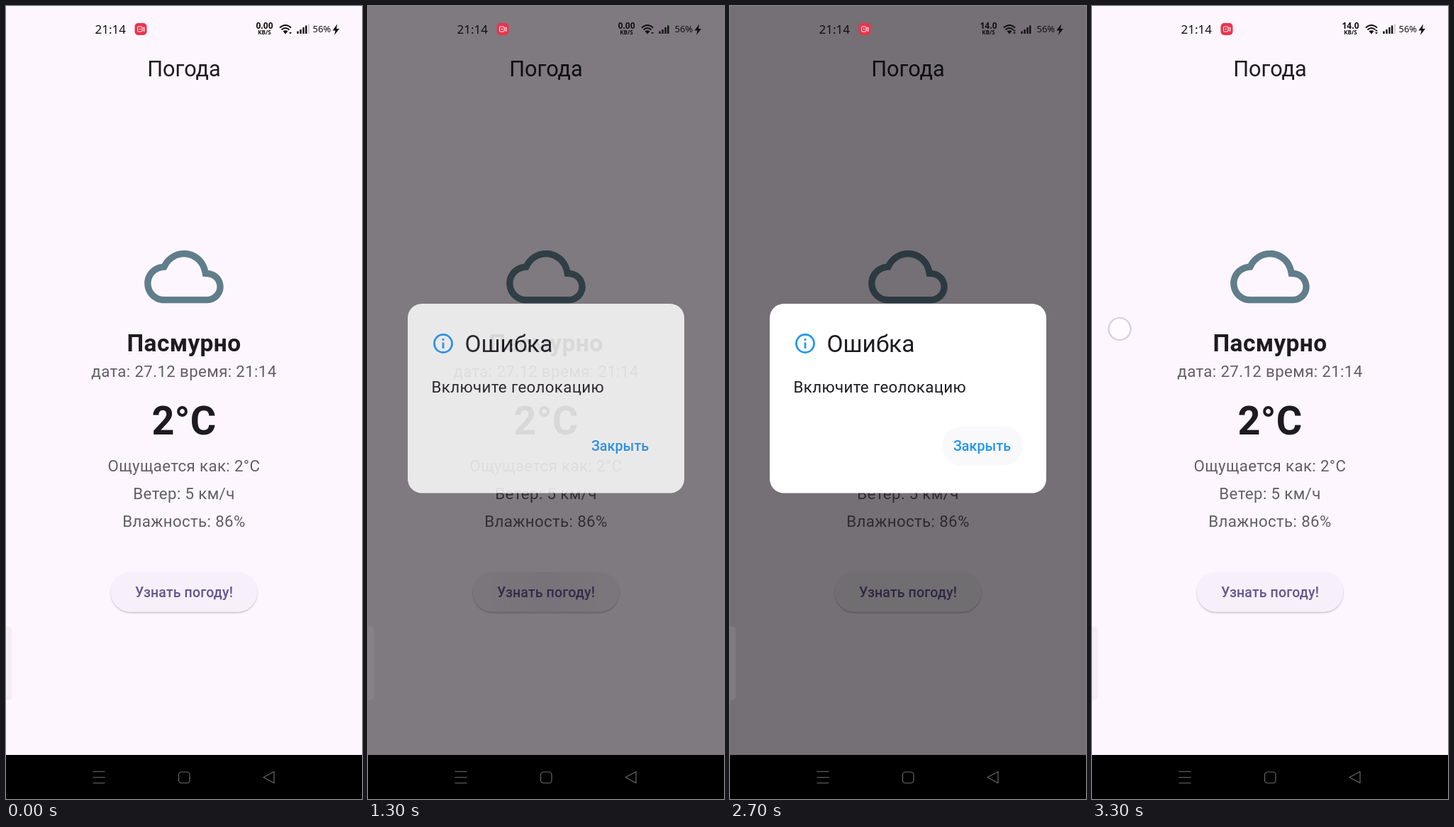
Recreate the animation shown at these times as an HTML page. Size 502 by 1116 pixels, loop 3.4 s.

```html
<!DOCTYPE html>
<html lang="ru">
<head>
<meta charset="utf-8">
<title>Погода</title>
<style>
  html, body { margin: 0; width: 100%; height: 100%; overflow: hidden; background: #fef6ff; }
  svg { display: block; width: 100vw; height: 100vh; }
  text { font-family: Roboto, sans-serif; fill: #1d1b20; white-space: pre; }
  .mid { text-anchor: middle; }
  .body { font-size: 22.3px; letter-spacing: .35px; }
  .soft { fill: #625e66; }
  .label { font-size: 19.5px; font-weight: 500; letter-spacing: .14px; }
  .status text { font-family: "Noto Sans", sans-serif; fill: #111; }
</style>
</head>
<body>
<svg viewBox="0 0 502 1116">
  <defs>
    <clipPath id="pill"><rect x="148" y="797" width="206" height="55.5" rx="27.7"/></clipPath>
    <radialGradient id="splash">
      <stop offset="0" stop-color="#65558f" stop-opacity=".15"/>
      <stop offset=".45" stop-color="#65558f" stop-opacity=".1"/>
      <stop offset="1" stop-color="#65558f" stop-opacity="0"/>
    </radialGradient>
    <filter id="shadow" x="-10%" y="-20%" width="120%" height="150%">
      <feDropShadow dx="0" dy="1.4" stdDeviation="1" flood-opacity=".28"/>
    </filter>
  </defs>

  <rect width="502" height="1116" fill="#fef6ff"/>
  <text class="mid" x="251" y="99" font-size="30.67">Погода</text>
  <path transform="translate(195.2 325.4) scale(4.647)" fill="#607d8b" d="M19.35 10.04C18.67 6.59 15.64 4 12 4 9.11 4 6.6 5.64 5.35 8.04 2.34 8.36 0 10.91 0 14c0 3.31 2.69 6 6 6h13c2.76 0 5-2.24 5-5 0-2.64-2.05-4.78-4.65-4.96zM19 18H6c-2.21 0-4-1.79-4-4 0-2.05 1.53-3.76 3.56-3.97l1.07-.11.5-.95C8.08 7.14 9.94 6 12 6c2.62 0 4.88 1.86 5.39 4.43l.3 1.5 1.53.11c1.56.1 2.78 1.41 2.78 2.96 0 1.65-1.35 3-3 3z"/>
  <text class="mid" x="251" y="486" font-size="33.46" font-weight="700" letter-spacing=".35">Пасмурно</text>
  <text class="mid body soft" x="251" y="522">дата: 27.12 время: 21:14</text>
  <text class="mid" x="251" y="603" font-size="55.77" font-weight="700" letter-spacing=".35">2°C</text>
  <text class="mid body soft" x="251" y="655">Ощущается как: 2°C</text>
  <text class="mid body soft" x="251" y="694">Ветер: 5 км/ч</text>
  <text class="mid body soft" x="251" y="733">Влажность: 86%</text>

  <rect x="148" y="797" width="206" height="55.5" rx="27.7" fill="#f7f0fa" filter="url(#shadow)"/>
  <g id="press" clip-path="url(#pill)">
    <rect x="148" y="797" width="206" height="56" fill="#65558f" opacity=".035"/>
    <circle id="ripple" cx="249" cy="825" r="85" fill="url(#splash)"/>
  </g>
  <text class="mid label" x="251" y="831.5" style="fill:#65558f">Узнать погоду!</text>

  <rect id="dim" width="502" height="1054"/>
  <path d="M0 873H2Q8.500 873 8.500 880V970Q8.500 977 2 977H0Z" fill="#bababa" opacity=".14"/>

  <g id="dialog">
    <rect x="56" y="419" width="390" height="266.500" rx="20" fill="#fff"/>
    <g transform="translate(106 475) scale(1.394)" fill="#2196f3">
      <circle r="9" fill="none" stroke="#2196f3" stroke-width="2"/>
      <path d="M-1-1H1V5H-1ZM-1-5H1V-3H-1Z"/>
    </g>
    <text x="136.500" y="486.500" font-size="33.46">Ошибка</text>
    <text class="body" x="89.500" y="544">Включите геолокацию</text>
    <rect id="closePress" x="299" y="591.500" width="114" height="55" rx="27.500" fill="#65558f"/>
    <text class="mid label" x="355.500" y="626" style="fill:#2196f3">Закрыть</text>
  </g>

  <g class="status">
    <text x="125.500" y="38.500" font-size="17">21:14</text>
    <rect x="181.500" y="24" width="17" height="17" rx="5" fill="#ea344d"/>
    <g fill="none" stroke="#fff">
      <rect x="185.500" y="29" width="6.500" height="7" rx="1"/>
      <path d="M192.500 32L195 30V35.500L192.500 33.500M187.500 32.500H190"/>
    </g>
    <text class="mid" id="speed" x="364.500" y="32" font-size="12" font-weight="600"></text>
    <text class="mid" x="364.500" y="40" font-size="8" font-weight="600">KB/S</text>
    <g fill="none" stroke="#111" stroke-width="2">
      <path d="M386 30.500Q394 23.500 402 30.500M388.500 33.500Q394 28.500 399.500 33.500"/>
    </g>
    <path d="M390.500 35.500Q394 33 397.500 35.500L394 39.500Z" fill="#111"/>
    <path d="M399 37H403L401 39.500Z" fill="#111"/>
    <path id="upArrow" d="M399 35.500H403L401 33Z" fill="#111"/>
    <path d="M411.500 39V35.500M415.500 39V33M419.500 39V30M423.200 39V27.500" stroke="#111" stroke-width="2.400"/>
    <path d="M427 39V25" stroke="#888" stroke-opacity=".45" stroke-width="1.500"/>
    <text x="432.500" y="37" font-size="13" font-weight="500">56%</text>
    <path d="M467 25.500L460.500 34.500H464.500L463 41L470 32H466Z" fill="#111"/>
  </g>

  <rect y="1054" width="502" height="62"/>
  <g fill="none" stroke="#686868" stroke-width="1.200">
    <path d="M122.500 1077.500H139.500M122.500 1085.500H139.500M122.500 1093.500H139.500"/>
    <rect x="243.500" y="1078" width="15.500" height="15.500" rx="4"/>
    <path d="M363 1085.500L378 1077.500V1093.500Z" stroke-linejoin="round"/>
  </g>

  <circle id="touch" cx="39" cy="454.500" r="15.500" fill="#fff" fill-opacity=".5" stroke="#d5cee4" stroke-width="2.200"/>
</svg>
<script>
  const LOOP = 3400, STEP = 100;
  const el = id => document.getElementById(id);
  const fade = (id, value) => el(id).setAttribute("opacity", value);

  // Each track lists [start in ms, value]; the value holds until the next entry.
  const tracks = {
    dim: [[0, 0], [1300, .5], [1400, .54], [2800, .4], [2900, 0]],
    dialog: [[0, 0], [1300, .84], [1400, 1], [2800, .63], [2900, 0]],
    press: [[0, 0], [1100, .5], [1200, 1], [1300, .3], [1400, 0]],
    closePress: [[0, 0], [2700, .04], [2800, .1], [2900, 0]],
    touch: [[0, 0], [3200, .5], [3300, 1]],
    upArrow: [[0, 0], [2300, 1]]
  };
  const valueAt = (track, t) => track.findLast(([start]) => start <= t)[1];

  function draw(now) {
    const t = Math.floor(now % LOOP / STEP) * STEP;
    for (const id in tracks) fade(id, valueAt(tracks[id], t));
    el("ripple").setAttribute("r", t < 1200 ? 35 : 85);
    el("speed").textContent = t < 2300 ? "0.00" : "14.0";
    requestAnimationFrame(() => draw(performance.now()));
  }
  draw(performance.now());
</script>
</body>
</html>
```
